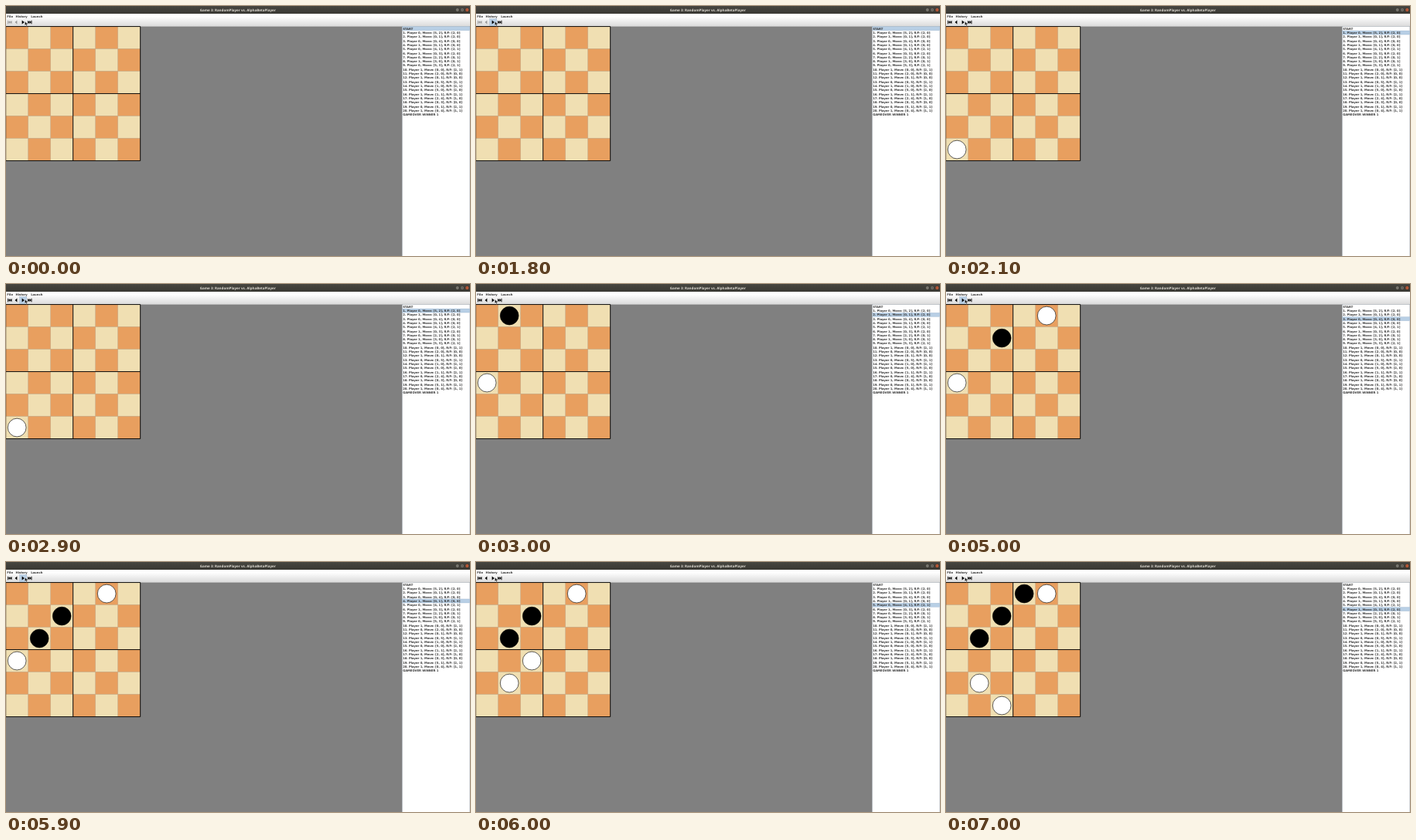
These frames come from a looping animation (600 px wide and 324 px high, 8000 ms). An HTML page:

```html
<!DOCTYPE html>
<html lang="en">
<head>
<meta charset="utf-8">
<title>Board game replay</title>
<style>
  html, body { margin: 0; width: 100%; height: 100%; overflow: hidden; background: #808080; }
  svg { display: block; width: 100vw; height: 100vh; }
  text { font: bold 12px "DejaVu Sans", sans-serif; fill: #333; text-rendering: geometricPrecision; white-space: pre; }
  #title { font: bold 14.4px "Open Sans", "Noto Sans", sans-serif; fill: #dfdbd2; text-anchor: middle; }
  .off { opacity: .35; }
  .hidden { visibility: hidden; }
</style>
</head>
<body>
<svg viewBox="0 0 1920 1036.8" preserveAspectRatio="none">
  <defs>
    <linearGradient id="bar" x2="0" y2="1">
      <stop offset="0" stop-color="#474640"/>
      <stop offset="1" stop-color="#393833"/>
    </linearGradient>
    <linearGradient id="tools" x2="0" y2="1">
      <stop offset=".2" stop-color="#fff"/>
      <stop offset="1" stop-color="#dadada"/>
    </linearGradient>
  </defs>

  <rect width="1920" height="1036.8" fill="#808080"/>
  <rect width="1920" height="32" fill="url(#bar)"/>
  <text id="title" x="959" y="22">Game 3: RandomPlayer vs. AlphaBetaPlayer</text>
  <g stroke="#2f2e2a" stroke-width="1.5">
    <circle cx="1868" cy="16" r="7" fill="#86847b"/>
    <circle cx="1888" cy="16" r="7" fill="#86847b"/>
    <circle cx="1908" cy="16" r="7" fill="#e2653a"/>
  </g>
  <path d="M1865 16h6M1885.5 13.5h5v5h-5zM1905.5 13.5l5 5m0-5l-5 5" stroke="#3a3934" stroke-width="1.5" fill="none"/>

  <rect y="32" width="1920" height="53" fill="url(#tools)"/>
  <text x="4" y="47">File</text>
  <text x="40" y="47">History</text>
  <text x="103" y="47">Launch</text>

  <rect id="press" x="57" y="53" width="29" height="29" fill="#b8cfe5" stroke="#8fa9c2"/>
  <g id="back">
    <path d="M7 60h3v14h-3zM17 60v14l-7-7zM24 60v14l-7-7z"/>
    <path d="M46 59v16l-9-8z"/>
  </g>
  <path d="M66 59v16l10-8zM90 60v14l7-7zM97 60v14l7-7zM104 60h3v14h-3z"/>

  <g id="board"></g>
  <g id="pieces" stroke="#000" stroke-width="2"></g>

  <rect x="1639.5" y="85" width="280" height="960" fill="#fff" stroke="#9aa6b2"/>
  <rect id="pick" x="1641" width="278" height="16" fill="#b8cfe5" stroke="#8fa9c2"/>
  <g id="list"></g>

  <path d="M78 64v17l4-4 3 7 3-1.5-3-6.5h6z" fill="#111" stroke="#fff" stroke-width="1.2"/>
</svg>

<script>
  const LOOP = 8000, PRESS = 100;
  const CELL = 92.8, LEFT = -1, TOP = 85;
  const ROW = 17, LIST_TOP = 85;
  const switches = [1900, 3000, 3900, 5100, 6000, 7000];

  // Each move: row, column, quadrant, 0 = rotate / 1 = flip
  const moves = ("5220 0120 0400 0100 4121 0320 2201 3001 5321 0021 " +
    "2000 0100 0521 1021 5020 1121 2410 0300 5121 0411")
    .split(" ").map(m => [...m].map(Number));

  const $ = id => document.getElementById(id);

  function add(parent, tag, attrs, text = "") {
    const el = document.createElementNS("http://www.w3.org/2000/svg", tag);
    for (const key in attrs) el.setAttribute(key, attrs[key]);
    el.textContent = text;
    parent.append(el);
  }

  function twist(piece, quad, flip) {
    const top = quad > 1 ? 3 : 0, left = quad % 2 * 3;
    const r = piece.r - top, c = piece.c - left;
    if (r < 0 || r > 2 || c < 0 || c > 2) return piece;
    return flip
      ? { ...piece, c: left + 2 - c }
      : { ...piece, r: top + c, c: left + 2 - r };
  }

  function position(count) {
    return moves.slice(0, count).reduce((pieces, [r, c, quad, flip], i) =>
      [...pieces, { r, c, player: i % 2 }].map(p => twist(p, quad, flip)), []);
  }

  function drawBoard() {
    const board = $("board"), size = 6 * CELL, half = size / 2;
    for (let i = 0; i < 36; i++) {
      const r = Math.floor(i / 6), c = i % 6;
      add(board, "rect", {
        x: LEFT + c * CELL, y: TOP + r * CELL, width: CELL, height: CELL,
        fill: (r + c) % 2 ? "#f0dfb2" : "#e89f5f"
      });
    }
    add(board, "path", {
      d: `M${LEFT} ${TOP}h${size}v${size}h${-size}zm0 ${half}h${size}m${-half} ${-half}v${size}`,
      fill: "none", stroke: "#000", "stroke-width": 3
    });
  }

  function drawList() {
    const lines = moves.map(([r, c, quad, flip], i) =>
      `${i + 1}. Player ${i % 2}, Move: [${r}, ${c}], R/F: [${quad}, ${flip}]`);
    ["START", ...lines, "GAMEOVER WINNER 1"].forEach((line, i) =>
      add($("list"), "text", { x: 1642, y: LIST_TOP + i * ROW + 13 }, line));
  }

  function show(step) {
    $("pieces").replaceChildren();
    for (const { r, c, player } of position(step)) {
      add($("pieces"), "circle", {
        cx: LEFT + (c + .5) * CELL, cy: TOP + (r + .5) * CELL, r: 38,
        fill: player ? "#000" : "#fff"
      });
    }
    $("pick").setAttribute("y", LIST_TOP + step * ROW + .5);
    $("back").classList.toggle("off", step === 0);
  }

  drawBoard();
  drawList();

  const start = performance.now();
  let shown = -1;
  function tick() {
    const t = (performance.now() - start) % LOOP;
    const step = switches.filter(s => t >= s).length;
    if (step !== shown) show(shown = step);
    // The play button lights up just before each move
    const pressed = switches.some(s => t >= s - PRESS && t < s);
    $("press").classList.toggle("hidden", !pressed);
    requestAnimationFrame(tick);
  }
  tick();
</script>
</body>
</html>
```
